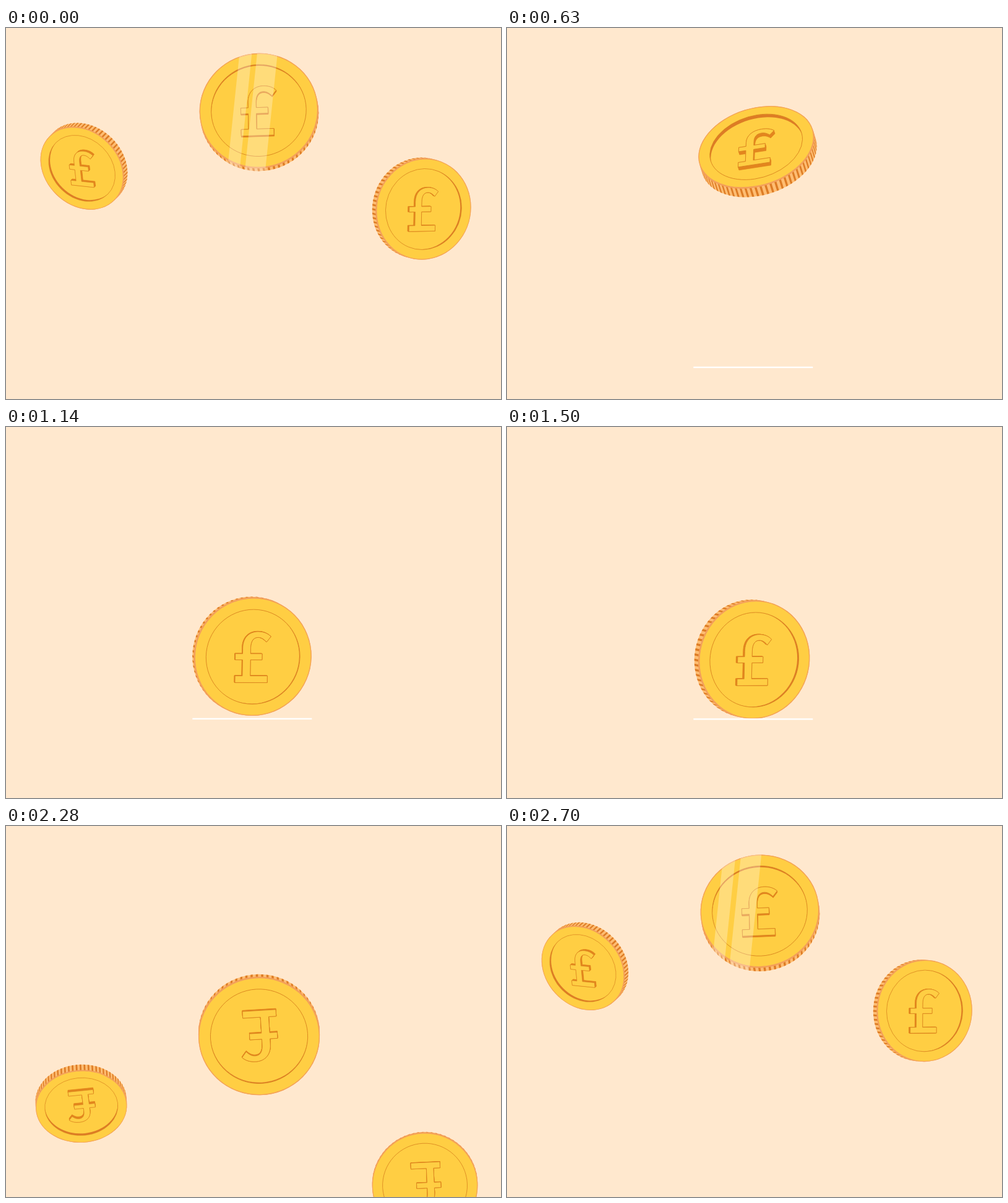
Recreate the animation shown at these times as an HTML page with a canvas. Size 800x600 px, loop 2730 ms.

```html
<!DOCTYPE html>
<html lang="en">
<head>
<meta charset="utf-8">
<title>Coins</title>
<style>
  html, body { margin: 0; width: 100%; height: 100%; overflow: hidden; background: #ffe8ce; }
  canvas { display: block; }
</style>
</head>
<body>
<canvas id="stage" width="800" height="600"></canvas>
<script>
const ctx = document.getElementById('stage').getContext('2d');
const LOOP = 2730, LEAD = 630;   // the toss starts LEAD ms before the loop wraps
const R = 96, THICK = 21, DEPTH = 7, RIDGES = 72, POWER = 2.15;
const GOLD = '#ffce43', RIM = '#f3a05a', EDGE = '#ffbd72', DARK = '#dd7c25', LINE = '#d9851f';
const RAD = Math.PI / 180;

const disc = new Path2D(), well = new Path2D();
disc.arc(0, 0, R, 0, 7);
well.arc(0, 0, 77, 0, 7);
const pound = new Path2D(
  'M-29 31H-17V5H-29V-5H-17V-14C-17-32-6-41 8-41C17-41 24-38 29-33L22-24' +
  'C18-28 14-31.5 8-31.5C0-31.5-4-25-4-14V-5H15V5H-4V31H24V42H-29Z');

// Eases through a few [time, value] points and holds at both ends
function glide(t, ...keys) {
  const next = keys.findIndex(key => key[0] > t);
  if (next < 0) return keys[keys.length - 1][1];
  if (next === 0) return keys[0][1];
  const [t0, v0] = keys[next - 1], [t1, v1] = keys[next];
  const u = (t - t0) / (t1 - t0);
  return v0 + (v1 - v0) * u * u * (3 - 2 * u);
}

const climb = (t, peak) => Math.max(0, 1 - t / peak) ** POWER;   // 1 at the start, 0 at the peak
const plunge = (t, peak) => 1000 * Math.max(0, t / peak - 1) ** POWER;
const after = (t, from) => Math.max(0, t - from) ** 2;
const drop = t => 0.0045 * after(t, 2120);

function leftCoin(t) {
  const peak = 695, s = climb(t, peak);
  return {
    x: glide(t, [180, 121.5], [560, 126], [680, 126], [960, 121]),
    y: 221 + 436 * s + plunge(t, peak),
    r: 73.7,
    pitch: glide(t, [640, 28], [1300, 112]) - 325 * s,
    yaw: glide(t, [180, -8], [560, -26], [700, -25], [960, 0])
  };
}

function rightCoin(t) {
  const peak = 755, s = climb(t, peak);
  return {
    x: 671.5 + 10 * s,
    y: 281 + 540 * s + plunge(t, peak),
    r: 82 + 6 * s,
    pitch: glide(t, [640, 13], [1280, 52]) - 339 * s,
    yaw: glide(t, [180, -4], [600, 21], [960, 26], [1260, 12])
  };
}

function middleCoin(t) {
  const s = climb(t, 760), land = 1543, hop = (t - land) / 247;
  const fall = Math.min(375, 128 + 50 * glide(t, [740, 0], [1075, 1]) + 0.0011 * after(t, 1120));
  const bounce = 60 * Math.max(0, hop * (1 - hop));
  const pitch = glide(t, [640, -9], [960, 47], [1260, -47], [1530, 5]) - 282 * s;
  return {
    x: glide(t, [630, 409], [960, 412], [1260, 405], [1950, 396], [2115, 396], [2400, 400]),
    y: fall + 367 * s + 190 * Math.exp(-t / 50) - bounce + drop(t),
    r: 95.8 + 4 * s,
    pitch,
    yaw: glide(t, [600, -3], [960, -17], [1500, -13], [1950, 21], [2115, 21], [2400, 0]),
    roll: 6 * Math.sin(pitch * RAD)
  };
}

function paint(path, fill, stroke, width) {
  if (fill) { ctx.fillStyle = fill; ctx.fill(path); }
  if (stroke) { ctx.strokeStyle = stroke; ctx.lineWidth = width; ctx.stroke(path); }
}

function drawGlint(x) {
  ctx.fillStyle = 'rgba(255,255,255,.29)';
  for (const [from, wide] of [[-42.5, 20], [-14, 33]]) {
    const l = x + from, r = l + wide;
    ctx.beginPath();
    ctx.moveTo(l + 11, -105);
    ctx.lineTo(r + 11, -105);
    ctx.lineTo(r - 11, 105);
    ctx.lineTo(l - 11, 105);
    ctx.fill();
  }
}

function drawCoin({ x, y, r, pitch, yaw, roll = 0 }, glint) {
  // Tilt about one axis lying in the screen plane
  const turn = Math.hypot(pitch, yaw) || 1e-6;
  const dx = yaw / turn, dy = pitch / turn;
  const cos = Math.cos(turn * RAD), sin = Math.sin(turn * RAD);
  const side = cos < 0 ? -1 : 1, k = cos - 1;
  const a = 1 + k * dx * dx, b = k * dx * dy, d = 1 + k * dy * dy;
  const mx = side * sin * dx, my = side * sin * dy;
  const top = THICK / 2, floor = top - DEPTH;
  // Places a flat shape at a height along the visible normal
  const at = (h, shape) => {
    const p = new Path2D();
    p.addPath(shape, new DOMMatrix([a * side, b * side, b, d, mx * h, my * h]).rotate(roll));
    return p;
  };

  ctx.save();
  ctx.translate(x, y);
  ctx.scale(r / R, r / R);
  ctx.lineJoin = 'round';

  const hull = new Path2D(), dir = Math.atan2(my, mx), q = Math.PI / 2, flat = R * Math.abs(cos);
  hull.ellipse(mx * top, my * top, flat, R, dir, -q, q);
  hull.ellipse(-mx * top, -my * top, flat, R, dir, q, 3 * q);
  hull.closePath();
  paint(hull, EDGE);

  const half = Math.PI / RIDGES * 0.42;
  for (let i = 0; i < RIDGES; i++) {
    const phi = i * 2 * Math.PI / RIDGES;
    if ((dx * Math.cos(phi) + dy * Math.sin(phi)) * sin >= 0) continue;
    const ridge = new Path2D();
    for (const [o, h] of [[-half, top], [half, top], [half, -top], [-half, -top]]) {
      const vx = R * Math.cos(phi + o), vy = R * Math.sin(phi + o);
      ridge.lineTo(a * vx + b * vy + mx * h, b * vx + d * vy + my * h);
    }
    paint(ridge, DARK);
  }

  ctx.save();
  ctx.clip(hull);
  paint(at(top, disc), GOLD, RIM, 2.6);
  ctx.restore();

  const rim = at(top, well);
  ctx.save();
  ctx.clip(rim);
  paint(rim, DARK);
  paint(at(floor, well), GOLD);
  ctx.restore();
  paint(rim, null, LINE, 0.9);

  for (let h = floor; h < top; h += 0.7) paint(at(h, pound), '#e3861f', '#e3861f', 0.5);
  paint(at(top, pound), GOLD, LINE, 0.9);

  if (glint !== undefined) {
    ctx.clip(hull);
    drawGlint(glint);
  }
  ctx.restore();
}

function drawShelf(t) {
  const rise = Math.min(1, (t - 1195) / 255);
  if (rise < 0) return;
  ctx.fillStyle = '#fff';
  ctx.fillRect(301.3, 470.7 + 140 * (1 - rise) ** 2 + drop(t), 193, 2.4);
}

const start = performance.now();
function frame() {
  const t = (performance.now() - start + LEAD) % LOOP;
  ctx.fillStyle = '#ffe8ce';
  ctx.fillRect(0, 0, 800, 600);
  drawCoin(leftCoin(t));
  drawCoin(rightCoin(t));
  drawCoin(middleCoin(t), (t - LEAD) * 0.92);
  drawShelf(t);
  requestAnimationFrame(frame);
}
frame();
</script>
</body>
</html>
```
